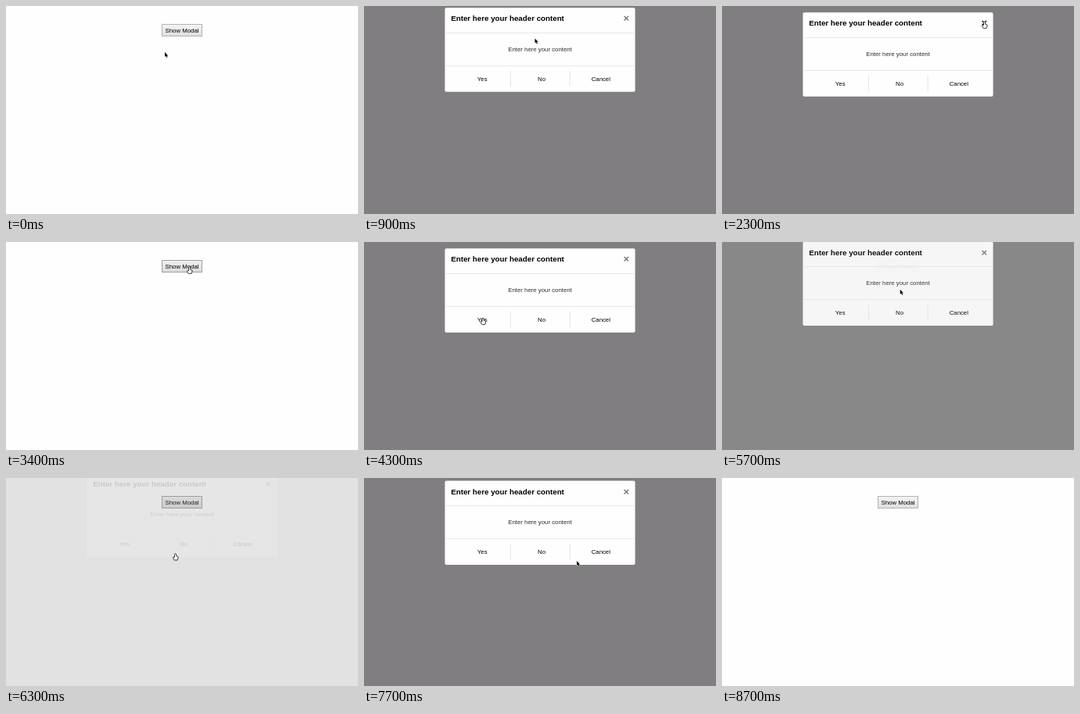
An HTML page with a canvas for the animation above (9.7 s loop, 450 by 266 pixels).

```html
<!DOCTYPE html>
<html lang="en">
<head>
<meta charset="utf-8">
<title>Modal demo</title>
<style>
  html, body { margin: 0; width: 100%; height: 100%; overflow: hidden; background: #fefefe; }
  canvas { display: block; width: 450px; height: 266px; }
</style>
</head>
<body>
<canvas id="stage" width="450" height="266"></canvas>
<script>
const ctx = document.getElementById('stage').getContext('2d');
const LOOP = 9700, TICK = 100;
const SANS = '"Liberation Sans", Arial, sans-serif';

// Each visit: when the modal starts to open and when it starts to close
const visits = [
  { open: 550, close: 2550 },
  { open: 3450, close: 4450 },
  { open: 5420, close: 5950 },
  { open: 7320, close: 8150 }
];

// Pointer path: time, x, y, shape held until the next stop
const path = [
  [0, 203, 59, 'arrow'], [300, 222, 32, 'hand'], [800, 222, 33, 'arrow'],
  [1000, 215, 50, 'arrow'], [1200, 150, 98, 'hand'], [1600, 227, 101, 'hand'],
  [1800, 303, 101, 'arrow'], [1900, 374, 60, 'arrow'], [2000, 326, 21, 'arrow'],
  [2100, 331, 21, 'hand'], [2300, 335.5, 20, 'hand'], [2800, 335.5, 20, 'arrow'],
  [3300, 234.5, 32, 'hand'], [3700, 234.5, 32, 'arrow'], [4200, 152, 97, 'hand'],
  [4700, 152, 97, 'arrow'], [5200, 237, 27, 'hand'], [5300, 239, 25, 'hand'],
  [5500, 239, 25, 'arrow'], [5900, 216.5, 96.5, 'hand'], [6300, 216.5, 96.5, 'hand'],
  [6400, 234, 24, 'hand'], [6500, 233, 22, 'hand'], [6600, 233, 22, 'hand'],
  [6800, 233, 36, 'hand'], [7200, 233, 36, 'arrow'], [7700, 272, 106, 'arrow'],
  [8100, 290, 160, 'arrow'], [8300, 290, 160, 'arrow'], [8700, 300, 280, 'arrow']
];

const handShape = new Path2D('M-1 .8Q0-.6 1 .8V3.2L3 3.8Q3.6 4.2 3.3 6L2.6 8.4H-1.2L-3 5.6Q-3-.0-1 5Z'.replace('-3-.0', '-3 3.8'));
const arrowShape = new Path2D('M0 0V6L1.4 4.8 2.4 7 3.5 6.5 2.5 4.4H4.2Z');

const clamp = v => Math.max(0, Math.min(1, v));
const mix = (a, b, k) => a + (b - a) * k;

function pointerAt(t) {
  const next = path.findIndex(stop => stop[0] > t);
  if (next < 0) return null;
  const a = path[next - 1], b = path[next];
  const k = (t - a[0]) / (b[0] - a[0]);
  return { x: mix(a[1], b[1], k), y: mix(a[2], b[2], k), shape: a[3] };
}

function modalAt(t) {
  const visit = visits.find(v => t >= v.open && t < v.close + 450);
  if (!visit) return { alpha: 0, shade: 0, y: 0 };
  if (t < visit.close) {
    const age = t - visit.open;
    return { alpha: clamp(age / 300), shade: clamp(age / 300), y: -20 * (1 - clamp(age / 500)) };
  }
  const age = t - visit.close;
  return { alpha: 1 - clamp(age / 400), shade: 1 - clamp(age / 450), y: -17 * clamp(age / 400) };
}

function text(label, x, y, size = 7.8, color = '#000', weight = 'normal', align = 'center') {
  ctx.font = `${weight} ${size}px ${SANS}`;
  ctx.textAlign = align;
  ctx.fillStyle = color;
  ctx.fillText(label, x, y);
}

function rect(x, y, w, h, color) {
  ctx.fillStyle = color;
  ctx.fillRect(x, y, w, h);
}

function drawButton(hover) {
  const fill = ctx.createLinearGradient(0, 23, 0, 39);
  fill.addColorStop(0, hover ? '#f0f0f0' : '#f6f6f6');
  fill.addColorStop(1, hover ? '#dadada' : '#dedede');
  rect(199, 23, 52, 16, fill);
  ctx.strokeStyle = hover ? '#a2a2a2' : '#b4b4b4';
  ctx.lineWidth = 1;
  ctx.strokeRect(199.5, 23.5, 51, 15);
  text('Show Modal', 225, 33.7);
}

function drawModal({ alpha, y }, closeHover) {
  ctx.save();
  ctx.globalAlpha = alpha;
  ctx.translate(0, y);
  ctx.fillStyle = '#fefefe';
  ctx.beginPath();
  ctx.roundRect(103.4, 8.3, 243.2, 107.5, 2);
  ctx.fill();
  for (const lineY of [40, 82]) rect(103.4, lineY, 243.2, 0.8, '#e4e4e4');
  for (const lineX of [187, 262.7]) rect(lineX, 89, 0.8, 20, '#dedede');
  text('Enter here your header content', 111.2, 25.4, 9.75, '#000', 'bold', 'left');
  text('×', 335.2, 26.4, 13, closeHover ? '#111' : '#777', 'bold');
  text('Enter here your content', 225, 63.7, 7.8, '#2c2c2c');
  ['Yes', 'No', 'Cancel'].forEach((label, i) => text(label, 151.2 + i * 75.8, 101.8));
  ctx.restore();
}

function drawPointer({ x, y, shape }) {
  const hand = shape === 'hand';
  const outline = hand ? handShape : arrowShape;
  ctx.save();
  ctx.translate(x, y);
  ctx.lineJoin = 'round';
  ctx.lineWidth = hand ? 0.8 : 1;
  ctx.strokeStyle = hand ? '#333' : '#fff';
  ctx.fillStyle = hand ? '#fff' : '#000';
  ctx.stroke(outline);
  ctx.fill(outline);
  if (hand) ctx.stroke(outline);
  ctx.restore();
}

function draw(t) {
  const modal = modalAt(t), pointer = pointerAt(t);
  const onHand = pointer && pointer.shape === 'hand';
  rect(0, 0, 450, 266, '#fefefe');
  drawButton(modal.shade > 0 || (onHand && pointer.y < 40));
  if (modal.shade > 0) {
    rect(0, 0, 450, 266, `rgba(4, 0, 4, ${0.5 * modal.shade})`);
    drawModal(modal, onHand && pointer.x > 325 && pointer.y < 30);
  }
  if (pointer) drawPointer(pointer);
}

function frame() {
  const t = performance.now() % LOOP;
  draw(Math.floor(t / TICK) * TICK);
  requestAnimationFrame(frame);
}
frame();
</script>
</body>
</html>
```
